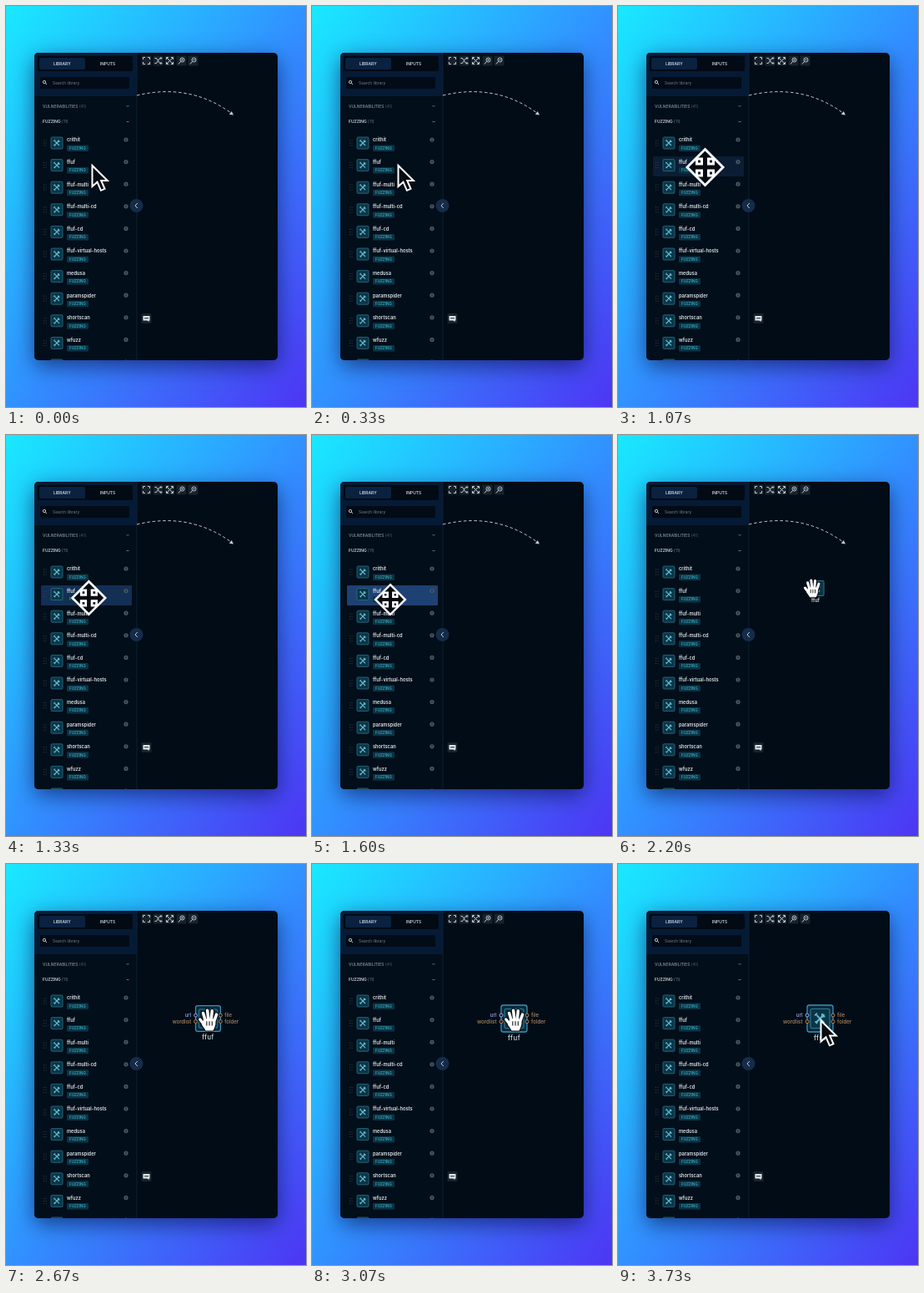
An HTML page for the animation above (3.79 s loop, 360x480 px).

```html
<!DOCTYPE html>
<html lang="en">
<head>
<meta charset="utf-8">
<title>Drag a tool onto the canvas</title>
<style>
html, body { margin: 0; width: 100%; height: 100%; overflow: hidden; }
body { background: linear-gradient(to bottom right, #19e9ff, #3192ff 50%, #4d35f4); }
svg { display: block; width: 360px; height: 480px; font-family: Inter, "Open Sans", sans-serif; }
.win { filter: drop-shadow(0 7px 13px rgba(4, 8, 60, .6)); }
.line { fill: none; stroke: #c3ccd3; stroke-width: 1; }
.name { font-size: 5.7px; font-weight: 600; fill: #dde5ea; }
.tag { font-size: 4.5px; font-weight: 500; fill: #43b3cb; }
.head { font-size: 4.9px; font-weight: 600; }
.port { font-size: 6.2px; font-weight: 500; }
</style>
</head>
<body>
<svg viewBox="0 0 360 480">
  <defs>
    <clipPath id="clip"><rect x="34" y="56" width="292" height="368" rx="5"/></clipPath>
    <g id="tile">
      <rect x="-7" y="-7" width="14" height="14" rx="1.2" fill="#0b3547" stroke="#28728a" stroke-width=".8"/>
      <path d="M-3 3L3 -3M-2.5 -2.5L3 3" stroke="#62bdd0" stroke-width="1.2"/>
      <path d="M1.5 -3.6V-1.5H3.6M-3.8 -2.2L-2.2 -3.8M-3.6 2L-2 3.6" fill="none" stroke="#62bdd0" stroke-width="1.1"/>
    </g>
    <path id="fingers" d="M-3 3L-6 -7M0 1L-1.3 -10M3 1L4 -9.5M6 3L9 -5.5M-4 7L-9.5 0" stroke-linecap="round"/>
    <path id="palm" d="M-5 0L7 0L7.5 5Q6.5 9 5 12H-3Q-4.5 9 -7 6Z" stroke-linejoin="round"/>
  </defs>

  <rect class="win" x="34" y="56" width="292" height="368" rx="5" fill="#010c16"/>
  <g clip-path="url(#clip)">
    <rect x="34" y="56" width="123" height="368" fill="#020e19"/>
    <rect x="34" y="56" width="123" height="52" fill="#051a35"/>
    <path d="M157 56V424" stroke="#14283a" stroke-width=".8"/>
    <rect x="38" y="60" width="114" height="18" rx="2" fill="#020a14"/>
    <rect x="40" y="62" width="55" height="14" rx="2" fill="#0a2140"/>
    <rect x="41" y="85" width="107" height="14" rx="1.5" fill="#020b16"/>
    <g class="head" fill="#c5d0d9">
      <text x="57" y="71">LIBRARY</text>
      <text x="113" y="71">INPUTS</text>
      <text x="44" y="121.5" fill="#87949e" font-weight="500">VULNERABILITIES <tspan fill="#435260">(41)</tspan></text>
      <text x="44" y="140">FUZZING <tspan fill="#53616d">(11)</tspan></text>
      <text x="56" y="94" fill="#75818d" font-weight="400">Search library</text>
    </g>
    <circle cx="46" cy="91" r="1.7" fill="none" stroke="#b5c0ca"/>
    <path class="line" d="M47.3 92.3L49 94"/>
    <path d="M144.5 119L146 120.5L147.5 119M144.5 138.5H147.5" fill="none" stroke="#7e8b96" stroke-width=".8"/>
    <rect id="hover" x="42" y="180" width="109" height="24" rx="1" fill="#1e4174"/>
    <g id="list"></g>
    <g id="tools"></g>
    <g transform="translate(168.5 374)">
      <rect x="-6" y="-6" width="12" height="12" rx="1.5" fill="#18232d"/>
      <path d="M-4 -3H4V2.5H3V4L1 2.5H-4Z" fill="#e0e5e8"/>
      <path d="M-2.5 -.2H2.5" stroke="#18232d" stroke-width="1.1"/>
    </g>
    <g id="guide">
      <path class="line" d="M157 107Q220 92 270 128" stroke-dasharray="3.5 2.8"/>
      <path d="M273 130.5L267.8 129.7L270.8 126Z" fill="#c3ccd3"/>
    </g>
  </g>
  <circle cx="156.5" cy="239" r="8" fill="#142c49"/>
  <path class="line" d="M157.8 236L155 239L157.8 242"/>

  <g id="ghost">
    <use href="#tile" transform="translate(5 .5) scale(1.3)"/>
    <text class="name" x="4" y="17" text-anchor="middle">ffuf</text>
  </g>
  <g id="node">
    <rect x="-15.5" y="-16" width="31" height="32" rx="2.5" fill="#082638" stroke="#3795bb" stroke-width="1.3"/>
    <use href="#tile" transform="scale(1.65)"/>
    <g class="port">
      <g fill="#9da8ea"><text x="-21" y="-2" text-anchor="end">url</text></g>
      <g fill="#ac8767">
        <text x="-21" y="5.7" text-anchor="end">wordlist</text>
        <text x="20.5" y="-2">file</text>
        <text x="20.5" y="5.7">folder</text>
      </g>
    </g>
    <g fill="#07131e" stroke-width="1">
      <circle cx="-15.5" cy="-4" r="2" stroke="#9da8ea"/>
      <circle cx="-15.5" cy="3.7" r="2" stroke="#b98358"/>
      <circle cx="15.5" cy="-4" r="2" stroke="#b98358"/>
      <circle cx="15.5" cy="3.7" r="2" stroke="#b98358"/>
    </g>
    <text x="0" y="26" text-anchor="middle" font-size="7.8" font-weight="500" letter-spacing=".5" fill="#dce4e8">ffuf</text>
  </g>

  <path id="arrow" d="M0 0V25L6 19.7L10.4 29.8L15 27.8L10.7 18H18.3Z" fill="#050b10" stroke="#fff" stroke-width="2"/>
  <g id="move">
    <path d="M0 -21.5L21.5 0L0 21.5L-21.5 0Z" fill="#060b10" stroke="#f2f4f5" stroke-width="3"/>
    <path id="notches" fill="#111d29" stroke="#fff" stroke-width="3"/>
  </g>
  <g id="hand">
    <use href="#fingers" stroke="#050b10" stroke-width="5.2"/>
    <use href="#palm" fill="#050b10" stroke="#050b10" stroke-width="3"/>
    <use href="#fingers" stroke="#fff" stroke-width="3.3"/>
    <use href="#palm" fill="#fff" stroke="#fff"/>
    <path d="M-2 2V7M1 2V7M4 2V7" stroke="#111" stroke-width="1"/>
  </g>
</svg>
<script>
const LOOP = 3790, STEP = LOOP / 57;
const $ = id => document.getElementById(id);

const names = ['crithit', 'ffuf', 'ffuf-multi', 'ffuf-multi-cd', 'ffuf-cd',
  'ffuf-virtual-hosts', 'medusa', 'paramspider', 'shortscan', 'wfuzz', ''];
$('list').innerHTML = names.map((name, i) => `
  <g transform="translate(0 ${164 + i * 26.6})">
    <use href="#tile" x="61"/>
    <path d="M45.5 -3.5V4.5M48 -3.5V4.5" stroke="#344550" stroke-dasharray="1 2"/>
    <text class="name" x="73" y="-1.7">${name}</text>
    <rect x="73" y="2.5" width="26" height="7.5" rx="1" fill="#0a3445"/>
    <text class="tag" x="76" y="7.9">FUZZING</text>
    <circle cx="144" cy="-4" r="2.6" fill="#4a5863"/>
    <path d="M144 -5.5V-2.5" stroke="#07131d" stroke-width=".8"/>
  </g>`).join('');

const lens = 'M-3.5 4L-1 1M-1.5 -1A2.5 2.5 0 1 0 3.5 -1A2.5 2.5 0 1 0 -1.5 -1';
const icons = [
  'M-4 -1.5V-4H-1.5M1.5 -4H4V-1.5M4 1.5V4H1.5M-1.5 4H-4V1.5',
  'M-4 -3H-2L2 3H4M-4 3H-2L2 -3H4M3 -4.5L4.5 -3L3 -1.5M3 1.5L4.5 3L3 4.5',
  'M-3.5 -3.5L3.5 3.5M-3.5 3.5L3.5 -3.5M-4 -1.5V-4H-1.5M1.5 -4H4V-1.5M4 1.5V4H1.5M-1.5 4H-4V1.5',
  lens + 'M0 -1H2M1 -2V0',
  lens + 'M0 -1H2'
];
$('tools').innerHTML = icons.map((d, i) => `
  <g transform="translate(${168.5 + i * 14} 65.5)">
    <rect x="-6" y="-6" width="12" height="12" rx="1" fill="#17222c"/>
    <path class="line" d="${d}"/>
  </g>`).join('');

$('notches').setAttribute('d', [[-1, -1], [1, -1], [-1, 1], [1, 1]]
  .map(([x, y]) => `M${x * 7 - 3} ${y * 7 - 3}h6v6h-6Z`).join(''));

// Pointer path: time, x, y, scale
const path = [
  [0, 104.5, 193, 1], [1070, 104.5, 193, 1], [1600, 94, 197, .83],
  [2200, 233, 183, .9], [2500, 243, 186, 1.07], [LOOP, 243, 186, 1.07]
];
const HOVER = 930, GRAB = 1660, DROP = 2500, RELEASE = 3270;

const ramp = (t, a, b) => {
  const p = Math.min(1, Math.max(0, (t - a) / (b - a)));
  return p * p * (3 - 2 * p);
};
const show = (id, on) => $(id).style.display = on ? '' : 'none';
const place = (id, x, y, s = 1) =>
  $(id).setAttribute('transform', `translate(${x} ${y}) scale(${s})`);

function pointer(t) {
  const i = path.findIndex(k => k[0] > t);
  const a = path[i - 1], b = path[i], p = ramp(t, a[0], b[0]);
  return [1, 2, 3].map(n => a[n] + (b[n] - a[n]) * p);
}

function draw(now) {
  const t = Math.floor(now % LOOP / STEP) * STEP;
  const [x, y, s] = pointer(t);
  const held = t >= GRAB && t < DROP;

  show('arrow', t < HOVER || t >= RELEASE);
  show('move', t >= HOVER && t < GRAB);
  show('hand', t >= GRAB && t < RELEASE);
  show('ghost', held);
  show('node', t >= DROP);
  show('guide', t < DROP);

  place('arrow', ...(t < HOVER ? [103.5, 191] : [243.5, 187.5]));
  place('move', x, y, s);
  place('hand', x, y, s);
  place('ghost', x, y);
  place('node', 242.5, 185, .65 + .35 * ramp(t, DROP, DROP + 200));
  $('hover').style.opacity = t < HOVER || t >= GRAB ? 0
    : .3 * ramp(t, HOVER, 1060) + .7 * ramp(t, 1130, 1530);
  requestAnimationFrame(draw);
}
requestAnimationFrame(draw);
</script>
</body>
</html>
```
